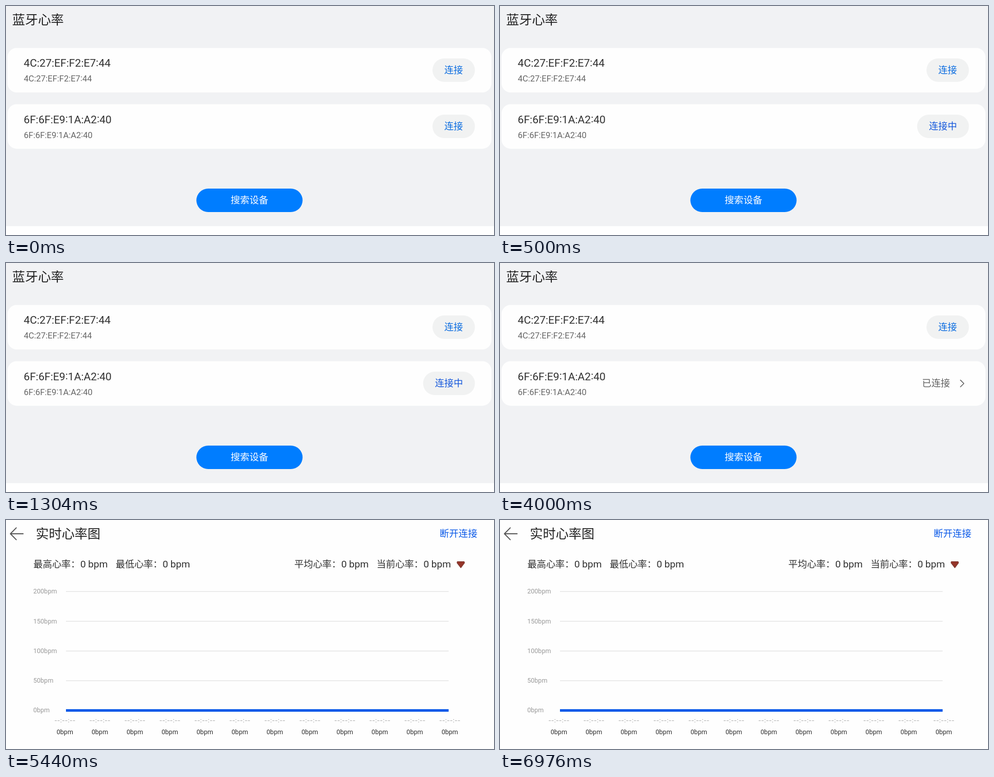
An HTML page that plays this animation: 952x449 px, repeating every 8000 ms.

```html
<!DOCTYPE html>
<html lang="zh-CN">
<head>
<meta charset="utf-8">
<title>蓝牙心率</title>
<style>
html, body { margin: 0; width: 100%; height: 100%; overflow: hidden; background: #fff; }
svg { display: block; width: 952px; height: 449px; }
text { font-family: Roboto, "Noto Sans CJK SC", "Noto Sans CJK", sans-serif; white-space: pre; }
.cn { font-family: "Noto Sans CJK SC", "Noto Sans CJK", sans-serif; }
.dash { font-family: Inter, sans-serif; }
.mid { font-weight: 500; }
</style>
</head>
<body>
<svg id="stage" viewBox="0 0 952 449" xmlns="http://www.w3.org/2000/svg"></svg>
<script>
const LOOP = 8000, CONNECTING = 500, CONNECTED = 1840, CHART = 5440;
const BLUE = '#0a59e8', INK = '#303030';
const stage = document.getElementById('stage');

const text = (x, y, size, fill, str, cls = '', anchor = 'start') =>
  `<text x="${x}" y="${y}" font-size="${size}" fill="${fill}" class="${cls}" text-anchor="${anchor}">${str}</text>`;
const cn = (x, y, size, fill, str, mid = '') => text(x, y, size, fill, str, 'cn ' + mid);
const box = (x, y, w, h, r, fill) =>
  `<rect x="${x}" y="${y}" width="${w}" height="${h}" rx="${r}" fill="${fill}"/>`;
const stroke = (d, color, width) =>
  `<path d="${d}" fill="none" stroke="${color}" stroke-width="${width}" stroke-linecap="round" stroke-linejoin="round"/>`;
const group = (id, body) => `<g id="${id}">${body}</g>`;

// Colons between two digits sit slightly higher.
const raise = (str, dy) =>
  str.replace(/(\d):(\d)/g, `$1<tspan dy="${-dy}">:</tspan><tspan dy="${dy}">$2</tspan>`);

const pill = (x, y, label, fill) =>
  box(x, y, 914.8 - x, 46, 23, '#f1f2f2') + cn(x + 23, y + 29.3, 18.3, fill, label, 'mid');

const card = (y, address) =>
  box(3, y, 944, 87.4, 18, '#fefefe') +
  text(34.6, y + 37, 21.1, INK, raise(address, 1.6)) +
  text(34.8, y + 66, 16.5, '#666', raise(address, 1.2));

function listPage() {
  return box(0, 0, 952, 431.6, 0, '#f1f2f4') +
    cn(12, 36.2, 25.2, '#222', '蓝牙心率', 'mid') +
    card(82.2, '4C:27:EF:F2:E7:44') +
    card(192.5, '6F:6F:E9:1A:A2:40') +
    pill(832, 102.8, '连接', '#0a6ce0') +
    group('idle', pill(832, 213.1, '连接', '#0a6ce0')) +
    group('busy', pill(813.7, 213.1, '连接中', '#1558dc')) +
    group('done', cn(823.3, 242.3, 18.3, '#606060', '已连接') +
      stroke('M898.3 229.6L904.9 236.2L898.3 242.8', '#606060', 1.6)) +
    box(371.4, 358, 207.2, 46, 23, '#007dff') +
    cn(438.2, 387.3, 18.4, '#fff', '搜索设备', 'mid');
}

function chartPage() {
  let out = box(0, 0, 952, 449, 0, '#fefefe') +
    stroke('M9 27H33.4M20 15.4L8.6 27L20 38.6', '#555', 2) +
    cn(58.3, 36.2, 25.2, '#222', '实时心率图', 'mid') +
    cn(846, 33.2, 18.4, BLUE, '断开连接', 'mid');

  [[53.5, '最高'], [214, '最低'], [562.5, '平均'], [723, '当前']].forEach(([x, kind]) => {
    out += cn(x, 93.2, 18.2, INK, kind + '心率：') + text(x + 91.4, 93, 19.1, INK, '0 bpm');
  });
  out += '<path d="M880.5 81.6H893.7L894.4 84L887.3 93.6L880 84Z" fill="#963529" stroke="#803a32" stroke-width="1.4" stroke-linejoin="round"/>';

  for (let i = 0; i < 5; i++) {
    const y = 140.2 + i * 58.3;
    out += text(53.3, y + 4, 12.5, '#999', 200 - i * 50 + 'bpm');
    if (i < 4) out += box(117, y - 0.6, 746.5, 1.3, 0, '#e1e1e1');
  }
  out += box(117, 370.9, 746.5, 5, 0, BLUE);

  for (let i = 0; i < 12; i++) {
    const x = 114.8 + i * 68.27;
    out += text(x, 397, 12.4, '#aaa', '--:--:--', 'dash', 'middle') +
      text(x, 419.5, 12.6, INK, '0bpm', '', 'middle');
  }
  return out;
}

stage.innerHTML = group('list', listPage()) + group('chart', chartPage());

const parts = {};
for (const id of ['list', 'idle', 'busy', 'done', 'chart']) parts[id] = document.getElementById(id);
const show = (id, on) => { parts[id].style.display = on ? '' : 'none'; };

function draw(now) {
  const t = now % LOOP;
  show('list', t < CHART);
  show('idle', t < CONNECTING);
  show('busy', t >= CONNECTING && t < CONNECTED);
  show('done', t >= CONNECTED);
  show('chart', t >= CHART);
}

const start = performance.now();
function tick() {
  draw(performance.now() - start);
  requestAnimationFrame(tick);
}
tick();
</script>
</body>
</html>
```
